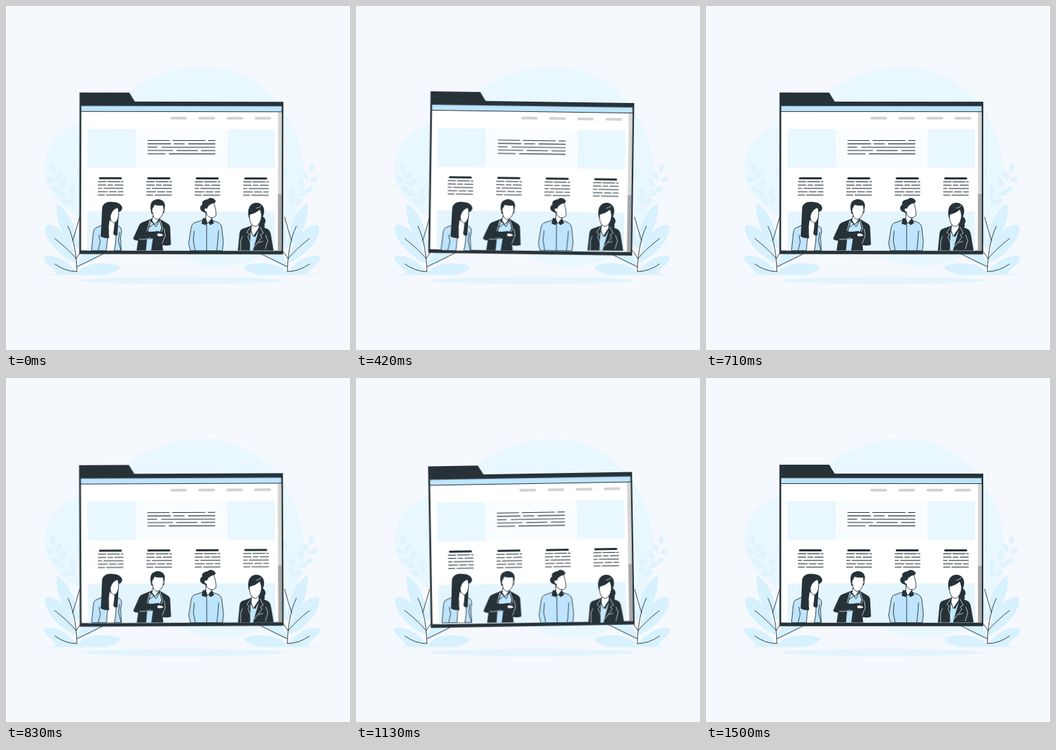
An HTML page that plays this animation: 500 px wide and 500 px high, repeating every 1.54 s.

```html
<!DOCTYPE html>
<html lang="en">
<head>
<meta charset="utf-8">
<title>Team page</title>
<style>
  html, body { margin: 0; width: 100%; height: 100%; overflow: hidden; background: #f5f9fe; }
  svg { display: block; width: 100vw; height: 100vh; }
  .ink { fill: #263238; }
  .sky { fill: #bee5fd; }
  .pale { fill: #e9f7ff; }
  .skin { fill: #fff; }
  .line { fill: none; stroke: #263238; stroke-width: .9; stroke-linecap: round; stroke-linejoin: round; }
  .edge { stroke: #263238; stroke-width: .9; stroke-linejoin: round; }
  .trim { fill: none; stroke: #fff; stroke-width: .7; stroke-linecap: round; stroke-linejoin: round; }
  #window { transform-origin: 255px 243.5px; }
</style>
</head>
<body>
<svg viewBox="0 0 500 500">
  <path class="pale" d="M56 238C56 205 75 182 107 172C150 158 168 127 200 110C250 85 300 81 345 101C395 124 433 185 433 245C433 300 402 349 365 367C330 383 285 383 255 362C200 340 130 330 90 295C68 278 56 260 56 238Z"/>
  <ellipse cx="256" cy="399" rx="149" ry="5.5" fill="#e3f4fd"/>

  <defs>
    <g id="plant">
      <g id="sprig" fill="#dff3fd"></g>
      <path d="M48 391.5Q75 389 103 388Q135 389 158 391.5Z" fill="#e3f4fd"/>
      <g fill="#d7f1fe">
        <path d="M74 287C91 296 103 324 104 352C86 343 70 312 74 287Z"/>
        <path d="M126 287C112 300 104 324 104 352C122 337 130 310 126 287Z"/>
        <path d="M57 319C72 314 95 334 103 374C78 366 53 337 57 319Z"/>
        <path d="M55 365C65 359 92 368 104 390H71C77 384 55 376 55 365Z"/>
        <path d="M103 390C113 371 148 371 166 378C164 387 149 390 141 390Z"/>
        <path d="M104 374C112 352 132 345 146 350C142 364 120 374 104 380Z"/>
      </g>
      <path class="line" d="M103 386C103 370 100 340 90 320M71 338Q90 353 102 367M71 375Q86 386 103 386M103 379Q128 367 146 358M102 367Q108 357 116 350M97 341Q102 325 107 307"/>
    </g>
  </defs>
  <use href="#plant"/>
  <use href="#plant" transform="translate(512 0) scale(-1 1)"/>

  <g id="window">
    <path class="ink" d="M106.7 126H179L187 139H403V360.8H106.7Z"/>
    <path class="sky" d="M109.3 145.5H400.5V153H109.3Z"/>
    <path fill="#fff" d="M109.3 154H400.5V355.6H109.3Z"/>
    <path fill="#d6d6d4" d="M395.3 154H400.5V273H395.3Z"/>
    <path fill="#a6a6a6" d="M395.3 273H400.5V355.6H395.3Z"/>
    <path class="pale" d="M118.5 179H391V235.5H118.5Z"/>
    <path fill="#fafdff" d="M188.5 179H322V235.5H188.5Z"/>
    <path fill="#e5f5fe" d="M118.5 298.5H391V355.6H118.5Z"/>
    <g id="copy" fill="none"></g>
  </g>

  <g class="person" data-x="148">
    <path class="sky edge" d="M140 318.5L129.5 323Q127 325 126.300 336L124.300 355.600H167.500L166.500 335L168 328Q168 322 164.500 320.500L157 317Z"/>
    <path class="skin" d="M148 318L158 317L160 335L157 355.600H146Z"/>
    <path class="line" d="M135 333L137 343L134 355M148 332L146 355M160 331Q160 346 157.500 355M165 329L163.500 341L167 355"/>
    <path class="ink" d="M139.800 293C141 286 149 283 157 285C163 285 169 289 169 294C168.500 297 166 299 164 299L162 333Q158 335 156 331L158 314L150 314Q149 330 150 337.500Q143 338 137.500 335C139 320 139 305 139.800 293Z"/>
    <path class="skin edge" d="M151.500 307C152 300 157 294 162.500 293C165 300 164 311 158.500 315Q155.500 315.500 152.500 312Z"/>
    <path class="skin" d="M150.500 311L156 315L157 322L154.500 332Q150 328 149.500 322Z"/>
  </g>

  <g class="person" data-x="214">
    <path class="ink" d="M212 309L198 314.500Q194 316 192.500 321L184.800 338Q186 341 192 341L189.800 355.600H228.500L227.500 347.500Q236 349 239.800 347L238.500 321Q237.500 317 233 315L223 309Z"/>
    <path class="sky" d="M209 312L216 318L223 312L226 323L223 329L207 328Z"/>
    <path class="sky" d="M205 339L213.500 338L211 355.600H203.500Z"/>
    <path class="skin edge" d="M213.500 305L212 312L216.500 317.500L222.500 310V304Z"/>
    <path class="line" d="M211 311L208 322L214.500 317L218 321L223.500 311"/>
    <path class="ink" d="M195 330L222 327L229 335Q222 339 211 337Q200 342 193 341Z"/>
    <path class="skin" d="M220 331Q225 329 229 333.500Q224 335.500 220 334Z"/>
    <path class="trim" d="M209 312L205 327M224 311L228 323L226 328M194 339Q203 340 210 337M230 324L231.500 334L227 345"/>
    <path class="ink" d="M211.500 302C208.500 290 210 284 216 282C222 278.500 231 282 231 290L229.500 301Z"/>
    <path class="skin edge" d="M212.500 294C214 293 215 290 215.500 288.500Q222 290.500 228.500 289.500C230 296 229 306 221 310C216 311 213.500 305 213.300 301Q211 299 212.500 294Z"/>
    <path class="skin edge" d="M229 295Q231.500 296 229 301"/>
  </g>

  <g class="person" data-x="291">
    <path class="sky edge" d="M285 311.500L273 315.500Q270 317 269 323L265.500 345L268 355.600H314.500L316 343L313.500 321Q312.500 317 309 315L300 311.500Z"/>
    <path class="line" d="M291.700 318V355.500M273.500 327L272.300 341L275 355.500M309 327L308 340L306.500 355.500"/>
    <path class="ink" d="M286 308.500L284.300 316.500L291 318.500L293 313L297 318.500L302.500 315.500L299 308Z"/>
    <path class="skin edge" d="M290.500 300V310L293 316.500L299 309V304Z"/>
    <path class="skin edge" d="M291 297L293 291L301.500 285C304 291 306 300 305 305Q302 309 297 307.500Q291 305 291 299Z"/>
    <path class="ink" d="M286 299C281 297 281 291 285.500 288.500C283.500 284 289 281 293.500 281C296 277.500 303 279 305 284Q303.500 287 299 287.300Q294 289 293.500 292L291 294.500Q292.500 299 290.500 301Z"/>
    <path class="skin edge" d="M292 294Q287.500 293 288.500 297Q289 300 292 299.500"/>
  </g>

  <g class="person" data-x="363">
    <path class="ink" d="M371 305C378 307 378.500 314 375.500 317Q377.500 321 373 323.500L367 321Z"/>
    <path class="ink" d="M356 319.500L343.500 324Q340.500 325 339.500 330L337 355.600H389L385 332Q384 326 380 324L368 319Z"/>
    <path class="sky" d="M355.500 328L362 336L367.500 326L361 348L359 355.600H354.500Z"/>
    <path class="skin edge" d="M357.500 316L356 326L359.500 335L367.500 323V315Z"/>
    <path class="trim" d="M355 322L350 329L354 332L351.500 335L357.500 350M369 321L374 330L369.500 333L372 336L361 350M343.500 335L341 342V355M377.500 333L380.500 341L377 353M367 344L373 342"/>
    <path class="ink" d="M353 308C350 296 354 286 364 286C373 286 377 294 374.500 303L370 314Z"/>
    <path class="skin edge" d="M354 303Q363 301 369 295.500C373 303 372 314 364 320Q361 321 358.500 319C354.500 315 353.500 309 354 303Z"/>
    <path class="trim" d="M364 294Q369 293 371 290"/>
  </g>
</svg>
<script>
  const NS = "http://www.w3.org/2000/svg";
  const LOOP = 1540, LEAD = 40;

  const add = (parent, tag, attrs) => {
    const el = document.createElementNS(NS, tag);
    for (const k in attrs) el.setAttribute(k, attrs[k]);
    document.getElementById(parent).append(el);
  };
  const rule = (x, y, w, width, stroke = "#263238", cap = "butt") =>
    add("copy", "path", { d: `M${x} ${y}h${w}`, stroke, "stroke-width": width, "stroke-linecap": cap });

  // Each row lists dash starts and ends.
  const paragraph = (x, y, rows, width) => rows.forEach((row, r) => {
    for (let i = 0; i < row.length; i += 2)
      rule(x + row[i], y + r * 4.85, row[i + 1] - row[i], width);
  });

  const intro = [[0, 32, 36, 84, 88, 98.5], [0, 34, 38, 54, 59, 98.5], [0, 14, 20, 98.5], [0, 37, 42, 73, 78, 98.5], [0, 26, 31, 98.5]];
  const bio = [[0, 12, 13.5, 32, 33.5, 37], [0, 12, 14, 22, 24, 37], [0, 6, 8, 37], [0, 14, 16, 27, 29, 37], [0, 10, 12, 37]];

  paragraph(205.7, 195.5, intro, 1.1);
  for (let i = 0; i < 4; i++) {
    rule(240.8 + i * 40.8, 163, 20.4, 3.8, "#d3d3d3", "round");
    rule(136.5 + i * 70.4, 250.6, 30.5, 3, "#263238", "round");
    paragraph(133.6 + i * 70.4, 255.5, bio, 1.1);
  }

  // x, y, tilt of the small leaves
  [[68, 235, -10], [77, 246, 25], [64, 252, -65], [83, 257, 30], [71, 266, -65], [96, 268, 25], [79, 272, -60], [86, 284, -60], [97, 281, 20], [107, 243, 10]]
    .forEach(([x, y, a]) => add("sprig", "path", {
      d: "M0-6.500C4-4 6 2 0 7C-6 2-4-4 0-6.500Z", transform: `translate(${x} ${y}) rotate(${a})`
    }));
  add("sprig", "path", { d: "M69 238Q76 268 103 298", fill: "none", stroke: "#dff3fd" });

  const sway = el => el.animate([
    { transform: "rotate(0deg)", offset: 0 },
    { transform: "rotate(1deg)", offset: .25 },
    { transform: "rotate(-1deg)", offset: .75 },
    { transform: "rotate(0deg)", offset: 1 }
  ], { duration: LOOP, delay: -LEAD, iterations: Infinity });

  sway(document.getElementById("window"));
  document.querySelectorAll(".person").forEach(p => {
    p.style.transformOrigin = `${p.dataset.x}px 310px`;
    sway(p);
  });
</script>
</body>
</html>
```
